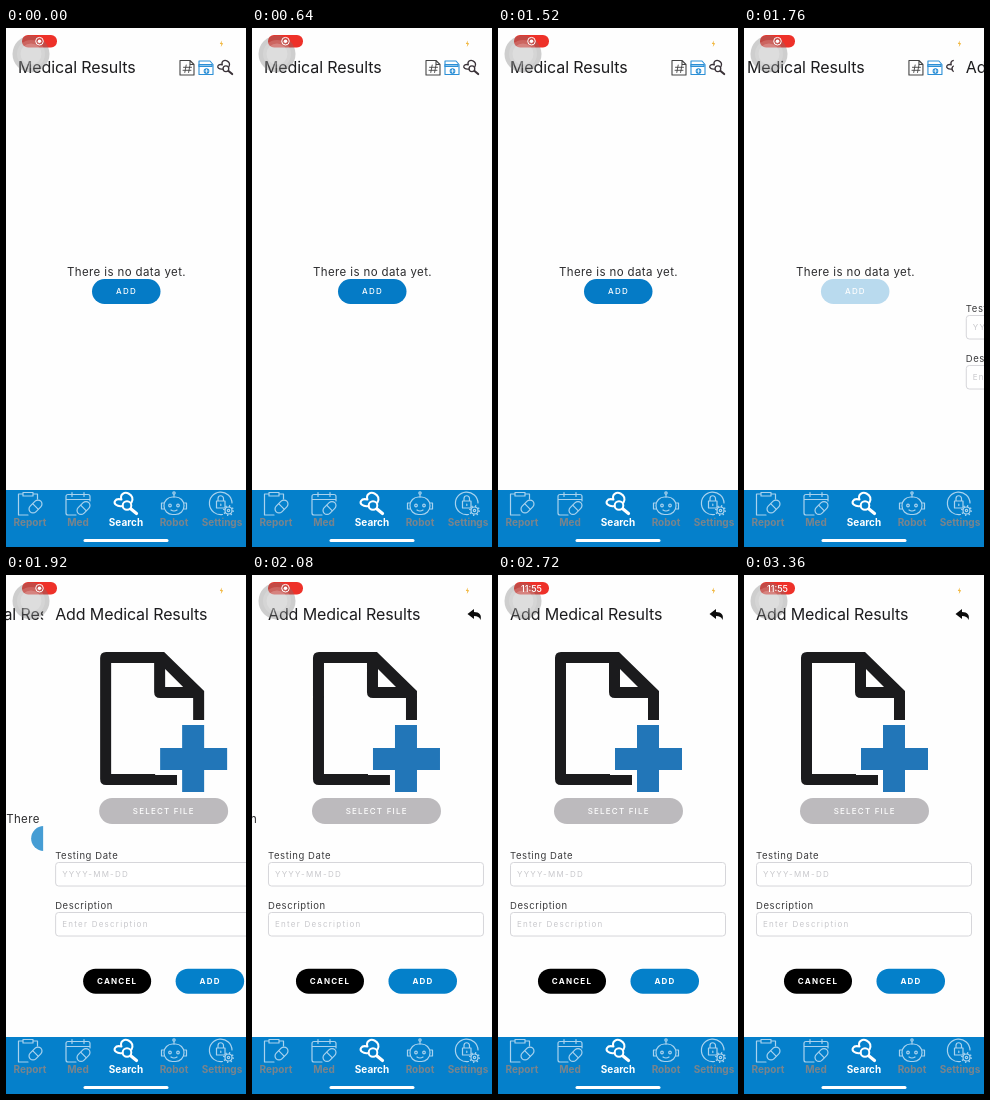
Write an HTML page that moves like this. It is 240 by 519 pixels and loops after 3.44 s.

```html
<!DOCTYPE html>
<html lang="en">
<head>
<meta charset="utf-8">
<title>Medical Results</title>
<style>
  html, body { margin: 0; width: 100%; height: 100%; overflow: hidden; background: #fff; }
  svg { display: block; width: 240px; height: 519px; }
  text { font-family: Inter, Roboto, sans-serif; fill: #1c1c1e; }
  .title { font-size: 16px; letter-spacing: -.1px; }
  .note { font-size: 11.5px; letter-spacing: .38px; fill: #2c2c2e; }
  .label { font-size: 9.5px; letter-spacing: .58px; fill: #3a3a3c; }
  .hint { font-size: 8px; letter-spacing: 1.25px; fill: #c8c8cc; }
  .btn { font-size: 8px; letter-spacing: 1.2px; fill: #fff; font-weight: 500; text-anchor: middle; }
  .strong { font-weight: 700; }
  .tab { font-size: 10px; font-weight: 700; fill: #7a848c; text-anchor: middle; }
  .on { fill: #fff; }
  .line { fill: none; stroke-linecap: round; stroke-linejoin: round; }
  .field { fill: #fff; stroke: #d6d6da; }
</style>
</head>
<body>
<svg viewBox="0 0 240 519">
  <defs>
    <g id="scope">
      <path d="M9 14.5C3 15.5 0 12 1.500 9.500S6 7.500 8 8C6 3 11 0 15 2S20 7 18 11"/>
      <circle cx="13.500" cy="14" r="4.300"/>
      <path d="M17.500 17.500L23 22" stroke-width="3.200"/>
    </g>
    <g id="pill"><rect x="-4" y="-7.500" width="8" height="15" rx="4" transform="rotate(45)"/><path d="M-2.600 -2.600L2.600 2.600"/></g>
  </defs>

  <rect width="240" height="519" fill="#fefefe"/>

  <g id="list">
    <text class="title" x="12" y="45">Medical Results</text>
    <g class="line" stroke="#444" stroke-width="1.100">
      <path d="M174 32.500h10l4 4v10.500h-14zM184 32.500v4h4"/>
      <path d="M180.200 37l-1.400 7.500M184 37l-1.400 7.500M177.500 39.300h8M177 42.300h8" stroke-width=".9"/>
    </g>
    <g class="line" stroke="#2b8fd6" stroke-width="1.100">
      <path d="M193 36v-3h11l3 3.500v10h-14z"/>
      <path d="M193 36.500h13v2h-13z" fill="#8cc4ea"/>
      <circle cx="200.500" cy="43" r="2.300" fill="#2b8fd6"/>
      <path d="M199 43h3M200.500 41.500v3" stroke="#fff" stroke-width=".8"/>
    </g>
    <use href="#scope" class="line" stroke="#3a3238" stroke-width="2" transform="translate(211 31.500) scale(.66)"/>
    <text class="note" x="61" y="247.700">There is no data yet.</text>
    <g id="add">
      <rect x="86" y="251" width="68.500" height="25" rx="12.500" fill="#057bc6"/>
      <text class="btn" x="120.500" y="266.300">ADD</text>
    </g>
  </g>

  <g id="form">
    <rect width="240" height="519" fill="#fefefe"/>
    <text class="title" x="12" y="45">Add Medical Results</text>
    <path d="M211.500 39L218 34V37C223.500 37 226 40 224.500 45C223.500 42 221.500 41 218 41V44Z" fill="#0c0c0c"/>
    <path fill="#1b1b1d" fill-rule="evenodd" d="M57 83q0-6 6-6H121L161 116V145H150V123H117q-6 0-6-6V88H68V199H134V210H63q-6 0-6-6zM122 94V112H140Z"/>
    <path d="M139 150h22v23h23v22h-23v22h-22v-22h-22v-22h22z" fill="#2276b8" stroke="#fefefe" stroke-width="10" paint-order="stroke"/>
    <rect x="56" y="223" width="129" height="26" rx="13" fill="#bcbabd"/>
    <text class="btn" x="120.700" y="238.600">SELECT FILE</text>
    <text class="label" x="12" y="284">Testing Date</text>
    <rect class="field" x="12.500" y="287.500" width="215" height="23.500" rx="3"/>
    <text class="hint" x="19" y="302">YYYY-MM-DD</text>
    <text class="label" x="12" y="334.300">Description</text>
    <rect class="field" x="12.500" y="337.500" width="215" height="23.500" rx="3"/>
    <text class="hint" x="19" y="352.300">Enter Description</text>
    <rect x="40" y="393.700" width="68" height="25" rx="12.500" fill="#000"/>
    <text class="btn strong" x="74" y="409.200">CANCEL</text>
    <rect x="132.500" y="393.700" width="68.500" height="25" rx="12.500" fill="#0480ca"/>
    <text class="btn strong" x="167" y="409.200">ADD</text>
  </g>

  <!-- status bar -->
  <rect x="16" y="7" width="35" height="12.500" rx="6" fill="#ee3129"/>
  <circle cx="25" cy="26" r="18.500" fill="#777" fill-opacity=".36"/>
  <circle cx="25" cy="26" r="14" fill="#fff" fill-opacity=".15"/>
  <circle cx="25" cy="26" r="10.500" fill="#fff" fill-opacity=".2"/>
  <g id="rec">
    <circle cx="33.500" cy="13.200" r="3.800" fill="none" stroke="#fff"/>
    <circle cx="33.500" cy="13.200" r="1.800" fill="#fff"/>
  </g>
  <text id="clock" x="33.500" y="16.500" font-size="9" font-weight="500" text-anchor="middle" style="fill:#fff">11:55</text>
  <path d="M216 12.500L213.800 16h1.600l-.6 3 2.400-3.700h-1.700z" fill="#f0b02c"/>

  <!-- tab bar -->
  <rect y="462" width="240" height="57" fill="#0580cb"/>
  <g class="line" stroke="#a9d2ee" stroke-width="1.200">
    <path d="M22 487H12.500V466H17M27 466H31.500V471M17 464.500h10v3.500h-10z"/>
    <use href="#pill" transform="translate(29.500 478.500)"/>
    <path d="M70 487H62q-2 0-2-2V468.500q0-2 2-2H82q2 0 2 2V473M60 471.500H84M66 464.500v4M78 464.500v4"/>
    <use href="#pill" transform="translate(77.500 480)"/>
    <rect x="158" y="469" width="20" height="17.500" rx="8.500"/>
    <path d="M168 469v-3M158 475h-2.500v6h2.500M178 475h2.500v6h-2.500M165 482q3 2 6 0"/>
    <circle cx="168" cy="465" r="1.200"/>
    <circle cx="164" cy="477.500" r="1.300"/>
    <circle cx="172" cy="477.500" r="1.300"/>
    <path d="M216.500 486.500A11.300 11.300 0 1 1 226 475"/>
    <path d="M210.500 473h8.500v7h-8.500zM212 473v-2.500a2.700 2.700 0 0 1 5.500 0v2.500M214.800 476v1.500"/>
    <circle cx="222.500" cy="482.500" r="4.400" stroke-width="2.200" stroke-dasharray="1.200 2.250" stroke-linecap="butt"/>
    <circle cx="222.500" cy="482.500" r="3.500"/>
    <circle cx="222.500" cy="482.500" r="1.200"/>
  </g>
  <use href="#scope" class="line" stroke="#fff" stroke-width="2" transform="translate(107.500 463.500)"/>
  <text class="tab" x="24" y="498">Report</text>
  <text class="tab" x="72" y="498">Med</text>
  <text class="tab on" x="120" y="498">Search</text>
  <text class="tab" x="168" y="498">Robot</text>
  <text class="tab" x="216" y="498">Settings</text>
  <rect x="77.500" y="511" width="85" height="3" rx="1.500" fill="#fff"/>
</svg>
<script>
  const LOOP = 3440, PUSH = 1725, RATE = 0.017, CLOCK = 2400;
  const el = id => document.getElementById(id);
  const [list, form, add, rec, clock] = ['list', 'form', 'add', 'rec', 'clock'].map(el);

  // [time, opacity] of the pressed button
  const press = [[0, 1], [1600, 1], [1700, .27], [1780, .27], [2000, 1], [LOOP, 1]];

  function track(steps, t) {
    const i = steps.findIndex(s => s[0] > t);
    const [t0, a] = steps[i - 1], [t1, b] = steps[i];
    return a + (b - a) * (t - t0) / (t1 - t0);
  }

  // critically damped slide from the right edge
  function slide(t) {
    const k = Math.max(0, t - PUSH) * RATE;
    const x = 240 * (1 + k) * Math.exp(-k);
    return x < .3 ? 0 : x;
  }

  const shift = (node, x) => node.setAttribute('transform', `translate(${x.toFixed(2)} 0)`);
  const show = (node, on) => node.setAttribute('visibility', on ? 'visible' : 'hidden');
  const start = performance.now();

  function draw() {
    const t = Math.max(0, performance.now() - start) % LOOP;
    const x = slide(t);
    shift(form, x);
    shift(list, (x - 240) * .3);
    add.setAttribute('opacity', track(press, t));
    show(rec, t < CLOCK);
    show(clock, t >= CLOCK);
    requestAnimationFrame(draw);
  }
  draw();
</script>
</body>
</html>
```
